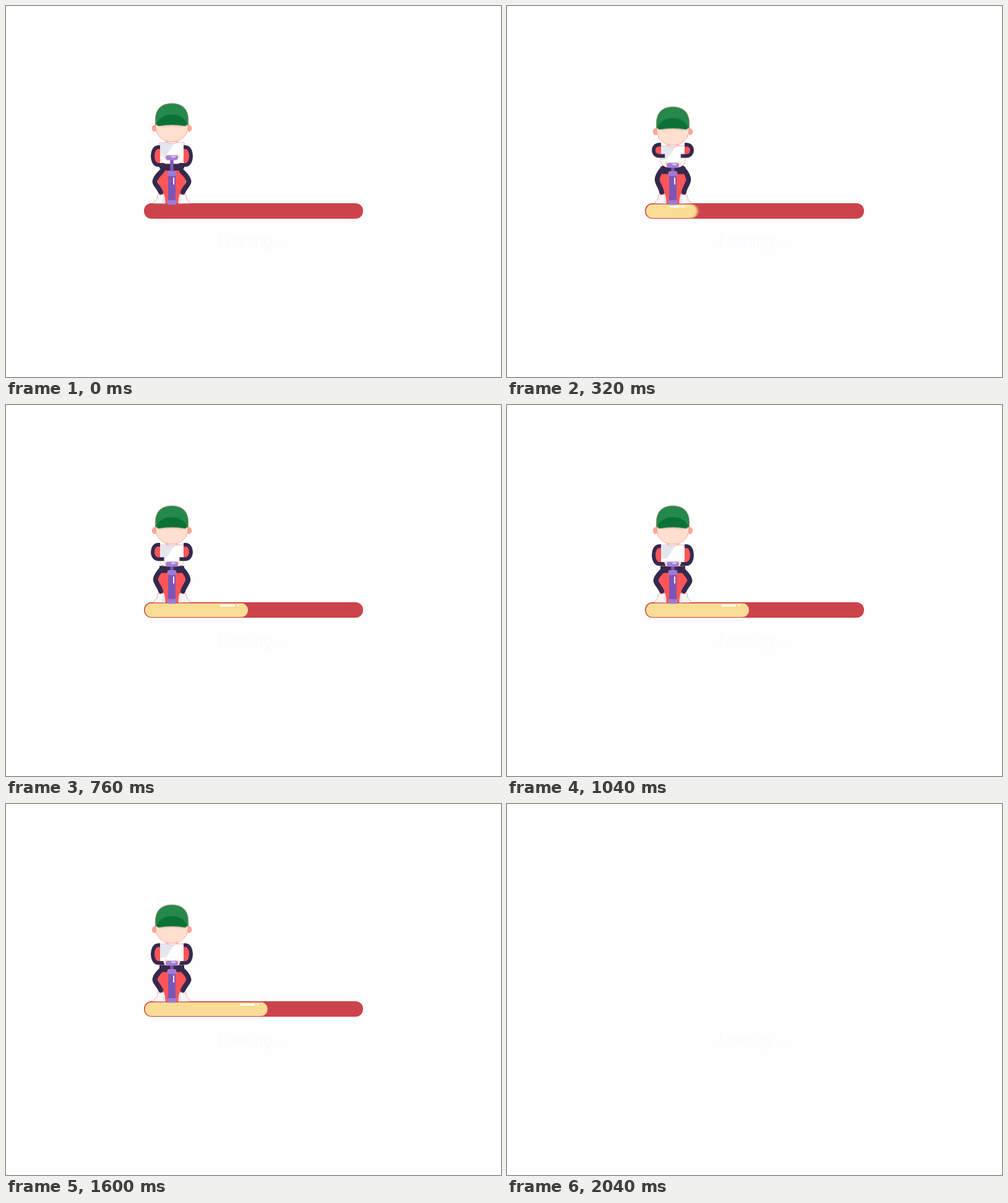
An HTML page for the animation above (2520 ms loop, 800x600 px).

```html
<!DOCTYPE html>
<html lang="en">
<head>
<meta charset="utf-8">
<title>Loading</title>
<style>
  html, body { margin: 0; width: 100%; height: 100%; overflow: hidden; background: #fefefe; }
  svg { display: block; width: 800px; height: 600px; }

  .scene { animation: show 2520ms step-end infinite; }
  .fill  { animation: grow 2520ms infinite; }
  .smear { animation: smear 2520ms step-end infinite; }
  .body, .handle, .arm, .leg, .crotch { animation: 280ms linear infinite; }
  .body   { animation-name: bob; }
  .handle { animation-name: push; }
  .arm    { animation-name: arm; fill: #ff5558; stroke: #35294d; stroke-width: 6; }
  .leg    { animation-name: leg; fill: none; stroke: #35294d; stroke-width: 8; stroke-linejoin: round; stroke-linecap: round; }
  .crotch { animation-name: crotch; fill: #ff5558; }
  .edge   { stroke: #e87a78; stroke-width: .6; }

  @keyframes show { 0% { opacity: 1; } 80.952%, 100% { opacity: 0; } }

  /* quick first rush, a pause, then a late surge to the end */
  @keyframes grow {
    0% { transform: translateX(224px); animation-timing-function: cubic-bezier(.42, 0, .58, 1); }
    25.397% { transform: translateX(391px); }
    39.683% { transform: translateX(391px); animation-timing-function: cubic-bezier(1, 0, 1, 1); }
    79.365%, 100% { transform: translateX(575.5px); }
  }
  @keyframes smear {
    0% { filter: none; }
    4.7% { filter: url(#smear); }
    22% { filter: none; }
    71% { filter: url(#smear); }
    79.3%, 100% { filter: none; }
  }

  @keyframes bob {
    0%, 100% { transform: translateY(0); }
    14.28%, 71.43% { transform: translateY(5.7px); }
  }
  @keyframes push {
    0%, 100% { transform: translateY(0); }
    14.28%, 71.43% { transform: translateY(12.5px); }
  }
  @keyframes arm {
    0%, 100% { d: path("M249 223.7H246C234 223.7 234 240.5 246 240.5H249M246 240.5H255"); }
    14.28%, 71.43% { d: path("M249 228.3H246C234 228.3 234 257 246 257H249M246 257H256"); }
  }
  @keyframes leg {
    0%, 100% { d: path("M252 262C247 268 243 274 243 280C243 287 249 293 250 301"); }
    14.28%, 71.43% { d: path("M252 267C247 272 241 278 240.5 284C241 289 248 295 250 301"); }
  }
  @keyframes crotch {
    0%, 100% { d: path("M252 262L244 280L252 302L258 319H278L284 302L292 280L284 262Z"); }
    14.28%, 71.43% { d: path("M252 267L242 284L252 302L258 319H278L284 302L294 284L284 267Z"); }
  }
</style>
</head>
<body>
<svg viewBox="0 0 800 600">
  <defs>
    <clipPath id="tube"><rect x="224.5" y="320.5" width="351" height="22.5" rx="11.2"/></clipPath>
    <filter id="smear" x="-5%" width="110%" y="-5%" height="110%" color-interpolation-filters="sRGB">
      <feGaussianBlur stdDeviation="2 0"/>
    </filter>
    <g id="limbs">
      <path class="leg" d="M252 262C247 268 243 274 243 280C243 287 249 293 250 301"/>
      <path class="arm" d="M249 223.7H246C234 223.7 234 240.5 246 240.5H249M246 240.5H255"/>
    </g>
    <g id="shoe">
      <path class="edge" fill="#f6f6f9" d="M245 305Q250 307 255 304Q258 312 257 319.5H239Q239 315 244 312Z"/>
      <path fill="#e3e5ee" d="M253 306L255 304Q258 312 257 319.5H252Q255 312 253 306Z"/>
    </g>
  </defs>

  <text x="342" y="390" fill="#f8f9ff" font-family="Roboto, 'Liberation Sans', sans-serif" font-size="27" font-weight="300" font-style="italic" letter-spacing="-.5">Loading....</text>

  <g class="scene">
    <rect x="223" y="319" width="354" height="25" rx="12" fill="#cc444b"/>
    <g clip-path="url(#tube)">
      <g class="fill">
        <g class="smear">
          <rect x="-400" y="320.5" width="400" height="22.5" rx="11.2" fill="#f9dd94"/>
          <g fill="#fff">
            <rect x="-45" y="323" width="24" height="3" rx="1.5"/>
            <circle cx="-16" cy="324.5" r="1.4"/>
          </g>
        </g>
      </g>
    </g>

    <path class="crotch" d="M252 262L244 280L252 302L258 319H278L284 302L292 280L284 262Z"/>
    <use href="#shoe"/>
    <use href="#shoe" transform="translate(536) scale(-1 1)"/>

    <g class="body">
      <path fill="#35294d" d="M248 254.5H288V262L284 266H252L248 262Z"/>
      <path class="edge" fill="#fefefe" d="M248 220.5H288V243Q287 255 277 255H259Q249 255 248 243Z"/>
      <path fill="#e5e7ef" d="M248 220.5H273L258 243H248Z"/>
    </g>
    <use href="#limbs"/>
    <use href="#limbs" transform="translate(536) scale(-1 1)"/>

    <g class="body">
      <path class="edge" fill="#fefefe" d="M258 219Q268 226 278 219Z"/>
      <g class="edge" fill="#ffa994">
        <ellipse cx="240" cy="197.5" rx="3.8" ry="5"/>
        <ellipse cx="296" cy="197.5" rx="3.8" ry="5"/>
      </g>
      <path class="edge" fill="#ffdfcd" d="M242 188H294V195C294 210 282 219.5 268 219.5S242 210 242 195Z"/>
      <path fill="#ebcfbe" d="M246 193Q268 189 290 193L284 196Q268 193 252 196Z"/>
      <path class="edge" fill="#25894c" d="M241.3 192V184C241.3 166 252 157.3 268 157.3S294.7 166 294.7 184V192Z"/>
      <path fill="#0b7236" d="M244 189C248 180 258 175.5 268 175.5S288 180 292 189Q293 194 289 194Q268 190 247 194Q243 194 244 189Z"/>
    </g>

    <g class="handle">
      <rect x="265.3" y="247" width="5.4" height="24" fill="#7c56b6"/>
      <g fill="#ffdfcd">
        <ellipse cx="258" cy="242.5" rx="3.6" ry="3.6"/>
        <ellipse cx="278" cy="242.5" rx="3.6" ry="3.6"/>
      </g>
      <rect x="258" y="241" width="20" height="8" rx="4" fill="#a47fd6"/>
      <rect x="267" y="242.7" width="7" height="1.6" rx=".8" fill="#fff"/>
    </g>
    <rect x="262" y="272" width="12" height="45" fill="#7c56b6"/>
    <rect x="260.7" y="267" width="14.6" height="8" rx="2.5" fill="#a07ad0"/>
    <rect x="260.5" y="314" width="15" height="7.5" rx="2" fill="#a07ad0"/>
    <rect x="270.2" y="277" width="1.8" height="12" rx=".9" fill="#fff"/>
  </g>
</svg>
</body>
</html>
```
